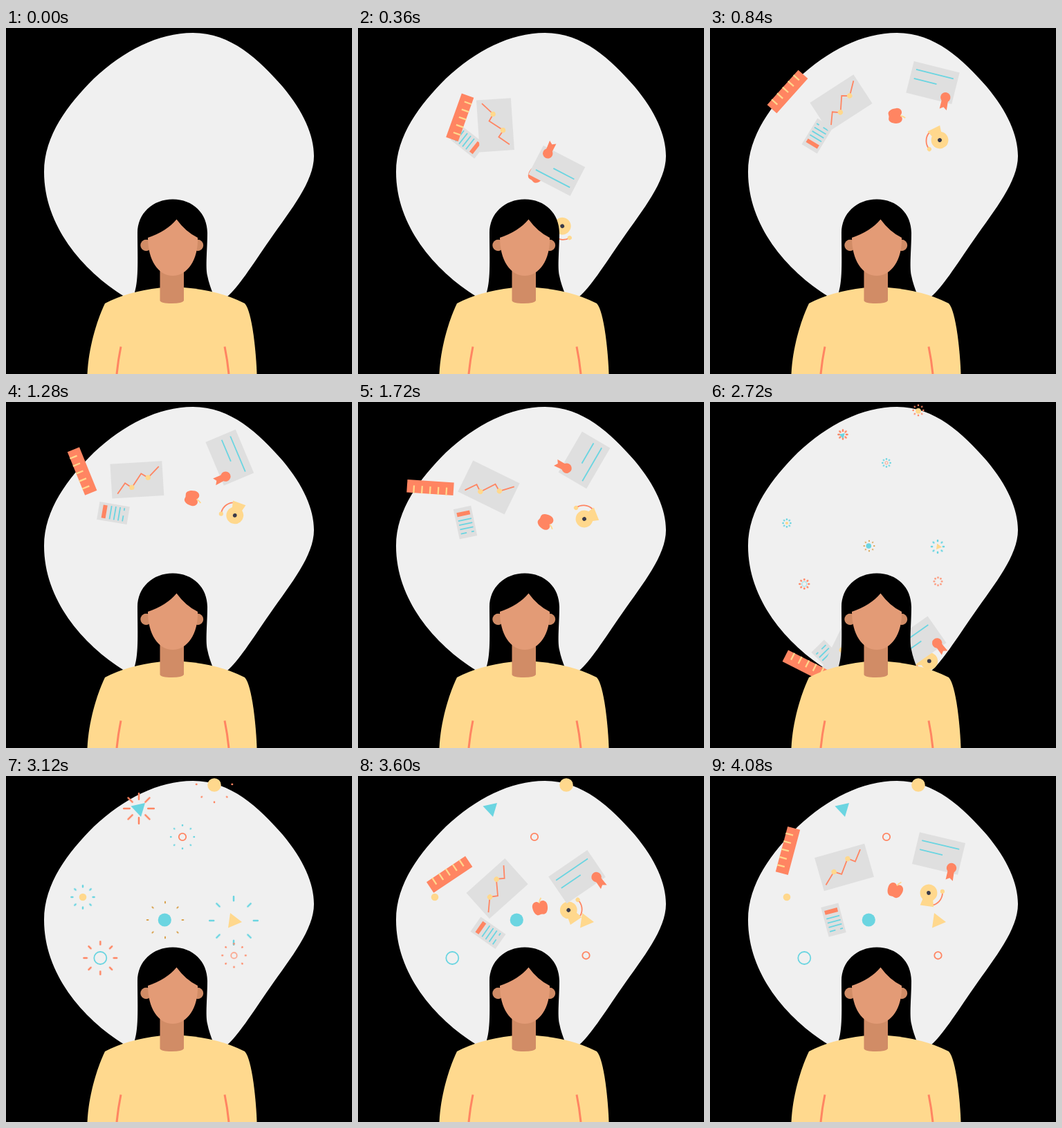
An HTML page for the animation above (5840 ms loop, 500 by 500 pixels).

```html
<!DOCTYPE html>
<html lang="en">
<head>
<meta charset="utf-8">
<title>Busy mind</title>
<style>
html, body { margin: 0; width: 100%; height: 100%; overflow: hidden; background: #000; }
svg { display: block; width: 100vw; height: 100vh; }

.red { fill: #ff8562; }
.yellow { fill: #ffd88d; }
.cyan { fill: #6bd5e1; }
.paper { fill: #dfdfdf; }
.line { fill: none; stroke-width: 1.8; }
.s-red { stroke: #ff8562; }
.s-yellow { stroke: #ffd88d; }
.s-cyan { stroke: #6bd5e1; }
.s-tan { stroke: #d8a04a; }

/* Thrown things: positions --p1..--p6 and angles --r0..--r7 along the loop */
.item {
  animation: toss 5840ms infinite linear, spin 5840ms infinite linear;
}
@keyframes toss {
  0% { translate: 240px 330px; }
  6.164% { translate: var(--p1); animation-timing-function: cubic-bezier(.2, .6, .4, 1); }
  14.384% { translate: var(--p2); animation-timing-function: cubic-bezier(.5, 0, .8, .7); }
  29.452% { translate: var(--p3); animation-timing-function: cubic-bezier(.45, .15, .8, .7); }
  41.096% { translate: var(--p4); }
  49.658% { translate: var(--p5); }
  54.795% { translate: 240px 330px; animation-timing-function: cubic-bezier(.2, .6, .35, 1); }
  69.863%, 100% { translate: var(--p6); }
}
@keyframes spin {
  0% { rotate: var(--r0); }
  6.164% { rotate: var(--r1); }
  14.384% { rotate: var(--r2); }
  29.452% { rotate: var(--r3); }
  41.096% { rotate: var(--r4); }
  49.658% { rotate: var(--r5); }
  54.795% { rotate: var(--r6); animation-timing-function: cubic-bezier(.3, .5, .5, 1); }
  69.863%, 100% { rotate: var(--r7); }
}
#ruler {
  --p1: 147.5px 129.5px; --p2: 112px 92px; --p3: 104.5px 123.5px;
  --p4: 101px 242px; --p5: 160px 460px; --p6: 112.5px 108px;
  --r0: 300deg; --r1: 200deg; --r2: 42deg; --r3: -86deg;
  --r4: -195deg; --r5: -270deg; --r6: 165deg; --r7: 15deg;
}
#chart {
  --p1: 198.5px 140.5px; --p2: 189.5px 108.5px; --p3: 189px 123.5px;
  --p4: 189.5px 245.5px; --p5: 200px 440px; --p6: 194px 132px;
  --r0: 30deg; --r1: 86deg; --r2: 147deg; --r3: 206deg;
  --r4: 271deg; --r5: 310deg; --r6: 250deg; --r7: 344deg;
}
#award {
  --p1: 287px 207px; --p2: 322px 79px; --p3: 327px 84px;
  --p4: 318.5px 166px; --p5: 290px 450px; --p6: 330.5px 112px;
  --r0: 80deg; --r1: 207deg; --r2: 374deg; --r3: 480deg;
  --r4: 640deg; --r5: 710deg; --r6: 560deg; --r7: 733.5deg;
}
#sheet {
  --p1: 159px 165px; --p2: 155px 156px; --p3: 155px 174px;
  --p4: 155px 240px; --p5: 180px 440px; --p6: 178.5px 208px;
  --r0: 60deg; --r1: 128deg; --r2: 211deg; --r3: 348deg;
  --r4: 452deg; --r5: 520deg; --r6: 560deg; --r7: 705deg;
}
#tape {
  --p1: 295px 287px; --p2: 332px 162px; --p3: 327px 169px;
  --p4: 329px 239px; --p5: 310px 450px; --p6: 316px 169px;
  --r0: 0deg; --r1: 58deg; --r2: 139deg; --r3: 233deg;
  --r4: 387deg; --r5: 480deg; --r6: 560deg; --r7: 714deg;
}
#apple {
  --p1: 257px 213px; --p2: 268px 127px; --p3: 271px 173px;
  --p4: 266px 280px; --p5: 255px 400px; --p6: 267.5px 165px;
  --r0: 0deg; --r1: 40deg; --r2: 86deg; --r3: 122deg;
  --r4: 160deg; --r5: 190deg; --r6: 260deg; --r7: 382deg;
}

.pop, .late {
  transform-box: fill-box; transform-origin: center;
  animation: pop 5840ms infinite linear;
}
.late { animation-name: late; }
@keyframes pop {
  0%, 45% { scale: 0; animation-timing-function: ease-out; }
  51%, 100% { scale: 1; }
}
@keyframes late {
  0%, 49.5% { scale: 0; opacity: 0; }
  54.3%, 100% { scale: 1; opacity: 1; }
}

.ray { fill: none; stroke-linecap: round; animation: ray 5840ms infinite linear; }
@keyframes ray {
  0%, 44.9% { stroke-dasharray: 0px 99px; stroke-dashoffset: -3px; opacity: 0; }
  45% { stroke-dasharray: 0px 99px; stroke-dashoffset: -3px; opacity: 1; }
  53.425% { stroke-dasharray: var(--len) 99px; stroke-dashoffset: calc(-1 * var(--from)); opacity: 1; }
  59.9% { stroke-dasharray: 0px 99px; stroke-dashoffset: calc(-1 * var(--end)); opacity: 1; }
  60%, 100% { stroke-dasharray: 0px 99px; stroke-dashoffset: calc(-1 * var(--end)); opacity: 0; }
}
</style>
</head>
<body>
<svg viewBox="0 0 500 500">
  <rect width="500" height="500"/>
  <path fill="#f0f0f0" d="M270 7C325 7 365 45 400 85C430 121 445 155 445 185C445 222 412 262 382 305C352 348 338 372 318 390L300 420H190L171 388C110 350 55 285 55 208C55 155 90 110 127 73C170 33 220 7 270 7Z"/>

  <g id="bursts"></g>

  <g>
    <path class="pop cyan" d="M180.5 43.5L201 39L195 59Z"/>
    <circle class="pop line s-red" cx="255" cy="88" r="5.2"/>
    <circle class="pop yellow" cx="111" cy="175" r="5.3"/>
    <circle class="pop cyan" cx="229.3" cy="208" r="9.6"/>
    <path class="pop yellow" d="M324 198L341 211L321 219.5Z"/>
    <circle class="pop line s-cyan" cx="136.3" cy="263" r="9"/>
    <circle class="late line s-red" cx="329.5" cy="259.3" r="5.2"/>
    <circle class="pop yellow" cx="301" cy="13" r="9.8"/>
  </g>

  <g class="item" id="apple">
    <path class="red" d="M0 -7C4 -12 11 -9 11 -2C11 6 7 11 3 10Q0 9 -3 10C-7 11 -11 6 -11 -2C-11 -9 -4 -12 0 -7Z"/>
    <path class="line s-yellow" d="M0 -7Q1 -11 4 -14"/>
  </g>
  <g class="item" id="tape">
    <path class="yellow" d="M-14 16L5 21L5 8L-8 5Z"/>
    <circle class="yellow" r="12.4"/>
    <path class="line s-red" d="M5 18A18.5 18.5 0 0 0 20 0"/>
    <circle class="yellow" cx="20" r="3.1"/>
    <circle r="2.9" fill="#3a3a4a"/>
  </g>
  <g class="item" id="award">
    <rect class="paper" x="-34" y="-23.5" width="68" height="47"/>
    <path class="line s-cyan" d="M-28 -12.8H27.5M-28 .7H5.8"/>
    <path class="red" d="M18.5 18V34L23.5 30.5L29 34L27.5 18Z"/>
    <circle class="red" cx="22.9" cy="16.1" r="7.2"/>
  </g>
  <g class="item" id="sheet">
    <rect class="paper" x="-13" y="-22" width="26" height="44"/>
    <rect class="red" x="-9.5" y="-16" width="19" height="6"/>
    <path class="line s-cyan" d="M-9.5 -4H10M-9.5 2.3H10M-9.5 8.6H10M-9.5 14.9H-1M6 14.9H10"/>
  </g>
  <g class="item" id="chart">
    <rect class="paper" x="-37.5" y="-25" width="75" height="50"/>
    <path class="line s-red" d="M-32.5 17.3L-16.1 2L-6.4 8.5L8.2 -11L17.6 -3.8L29.3 -18.6"/>
    <circle class="yellow" cx="-16.1" cy="2.2" r="3.7"/>
    <circle class="yellow" cx="8.2" cy="-10.6" r="3.7"/>
  </g>
  <g class="item" id="ruler">
    <rect class="red" x="-9.3" y="-33.7" width="18.6" height="67.4"/>
    <path class="line s-yellow" style="stroke-width:2.3" d="M-9.5 -23.6H1.5M-9.5 -11.8H1.5M-9.5 0H1.5M-9.5 11.8H1.5M-9.5 23.6H1.5"/>
  </g>

  <g>
    <path d="M186 382C192 362 190 330 190 296C190 268 212 247.500 241 247.500C270 247.500 291 268 291 296C291 320 288 345 291 358C293 368 296 376 299 384Z"/>
    <path fill="#ffd98e" d="M143 398Q175 381 222 375.500L257 375Q308 379 345 398C356 410 361.500 470 362.500 500H117.500C119 465 130 425 143 398Z"/>
    <path class="line s-red" style="stroke-width:3" d="M166 460.500Q162 480 160 500M316 460.500Q320 480 322 500"/>
    <g fill="#d18c66">
      <circle cx="202.500" cy="314" r="8.200"/>
      <circle cx="277" cy="314" r="8.200"/>
      <path d="M222.500 340H257V394Q255 398 239.500 398Q224 398 222.500 394Z"/>
    </g>
    <path fill="#e39b76" d="M205 303Q232 294 246.500 276.500Q260 295 277 303C278 335 262 358 241 358C220 358 205 335 205 303Z"/>
  </g>
</svg>
<script>
// x, y, colour, stroke width, inner radius, length, end radius
const bursts = [
  [192, 47, 's-red', 2.5, 13.2, 8.6, 27],
  [255, 88, 's-cyan', 2.6, 16.6, 0.3, 20],
  [111, 175, 's-cyan', 2.4, 14.6, 2, 20],
  [230, 208, 's-tan', 2.2, 24.6, 1.6, 30],
  [329, 209, 's-cyan', 2.5, 28.8, 6, 40],
  [136.3, 263, 's-red', 2.4, 19.4, 4.4, 28],
  [329.5, 259.3, 's-red', 2.5, 16.6, 0.4, 20],
  [301, 12, 's-red', 2.6, 25.6, 0.4, 30],
];
document.getElementById('bursts').innerHTML = bursts.map(([x, y, tone, w, from, len, end]) => {
  const ray = (_, i) => `<path class="ray" d="M0 0H60" transform="rotate(${i * 45})"/>`;
  return `<g class="${tone}" transform="translate(${x} ${y})" stroke-width="${w}"
    style="--from:${from}px;--len:${len}px;--end:${end}px">${Array.from({ length: 8 }, ray).join('')}</g>`;
}).join('');
</script>
</body>
</html>
```
